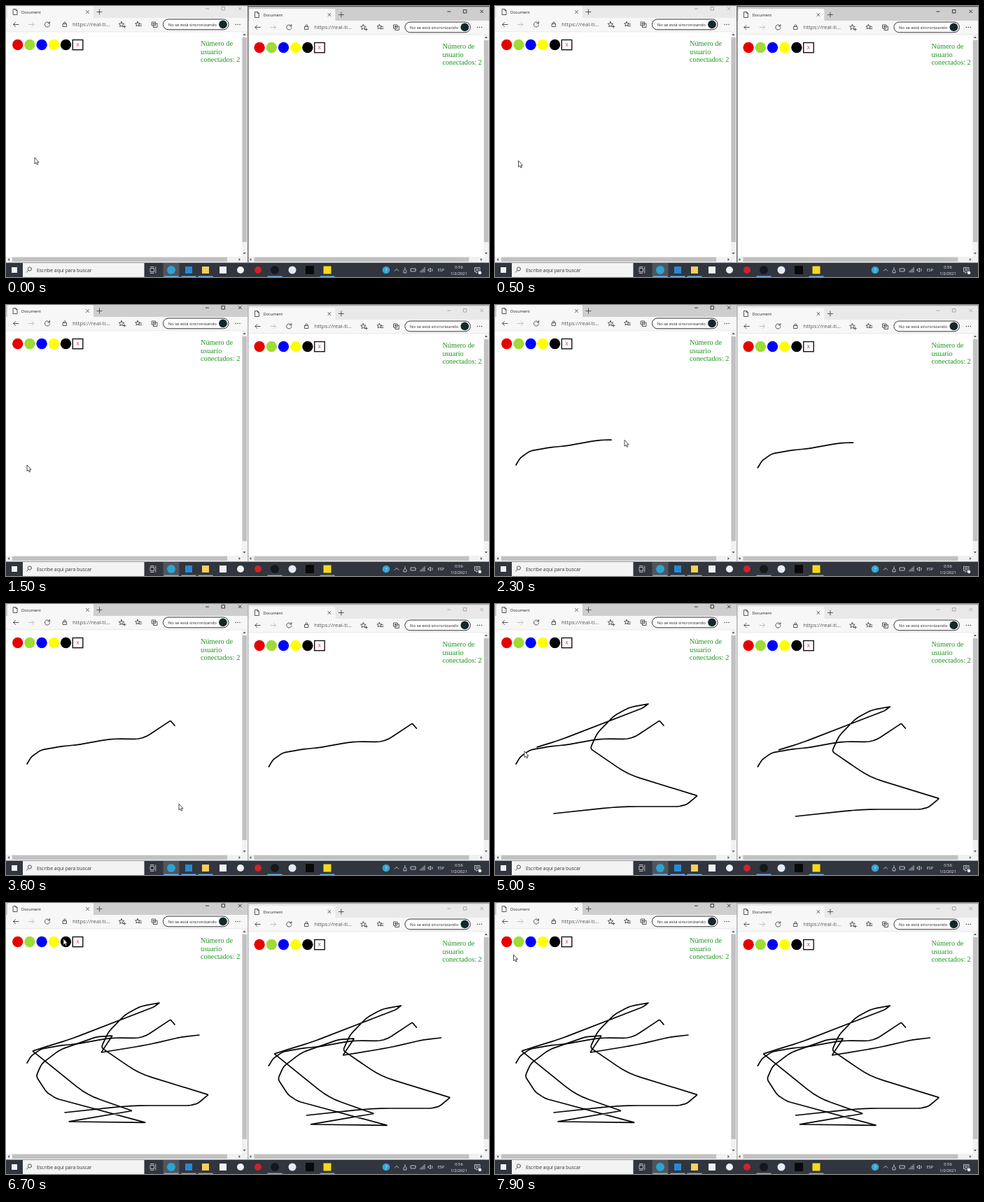
An HTML page that plays this animation: 690x388 px, repeating every 8000 ms.

```html
<!DOCTYPE html>
<html lang="es">
<head>
<meta charset="utf-8">
<title>Pizarra</title>
<style>
  html, body { margin: 0; width: 100%; height: 100%; overflow: hidden; background: #fff; }
  svg { display: block; width: 690px; height: 388px; }
  text { font-family: "Open Sans", "Noto Sans", sans-serif; fill: #222; }
  .count { font: 10.3px "Liberation Serif", "Times New Roman", serif; fill: #209420; }
  .icon { fill: none; stroke: #444; stroke-width: .9; stroke-linecap: round; stroke-linejoin: round; }
  .ink { fill: none; stroke: #000; stroke-width: 1.7; stroke-linecap: round; stroke-linejoin: round; }
  .strip { fill: #e9e9e9; }
  .ctl { fill: none; stroke: #999; stroke-width: .8; }
  .edge { stroke: #aaa; stroke-width: 1.3; }
  .on .strip { fill: #cecece; }
  .on .ctl { stroke: #111; }
  .on .edge { stroke: #555; }
  .tray { fill: none; stroke: #ddd; stroke-width: .8; }
  .light { fill: #f2f2f2; }
</style>
</head>
<body>
<svg id="stage" viewBox="0 0 690 388"></svg>
<script>
const LOOP = 8000, STEP = 100, FOCUS = 1500;
const LAG = 19;     // px of ink still missing behind the pointer
const BEND = .3;    // how far a corner is rounded into its sides

const START = [41, 217];
const moves = [
  { end: 1000, to: [[26, 226]] },
  { end: FOCUS, to: [[30, 229]] },
  { end: 2620, ink: true, to: [
    [36, 219], [50, 209], [78, 204], [103, 201.5], [150, 193], [195, 193.5], [235, 167], [241, 174]] },
  { end: 3600, to: [[247, 286]] },
  { end: 3900, to: [[84, 300]] },
  { end: 6370, ink: true, to: [
    [178, 290], [262, 290], [274, 287], [289, 274.5], [190, 244], [136, 207], [146, 185],
    [170, 160], [192, 148], [219, 143], [211, 149], [92, 195], [53, 207], [38, 212],
    [116, 275], [180, 297.5], [90, 313], [199, 314.3], [72, 280], [58, 271], [43, 248],
    [51, 230], [77, 210], [130, 191.5], [152, 190], [136, 214], [200, 203.5], [250, 192], [276, 189]] },
  { end: 6700, to: [[82, 51]] },
  { end: 7200, to: [[16, 52]] },
  { end: LOOP, to: [[28, 77]] }
];

const mix = (a, b, k) => a.map((v, i) => v + (b[i] - v) * k);
const gap = (a, b) => Math.hypot(b[0] - a[0], b[1] - a[1]);

// Rounds open corners and leaves sharp reversals pointed.
function smooth(pts) {
  return pts.flatMap((q, i) => {
    const p = pts[i - 1], n = pts[i + 1];
    if (!p || !n) return [q];
    const a = gap(p, q), b = gap(q, n);
    const dot = ((q[0] - p[0]) * (n[0] - q[0]) + (q[1] - p[1]) * (n[1] - q[1])) / (a * b);
    const r = BEND * Math.min(a, b) * (1 + dot) / 2;
    const from = mix(q, p, r / a), to = mix(q, n, r / b);
    return [0, .25, .5, .75, 1].map(k => mix(mix(from, q, k), mix(q, to, k), k));
  });
}

let time = 0, spot = START;
for (const move of moves) {
  move.start = time;
  move.pts = smooth([spot, ...move.to]);
  move.len = [0];
  move.pts.slice(1).forEach((p, i) => move.len.push(move.len[i] + gap(move.pts[i], p)));
  move.total = move.len.at(-1);
  time = move.end;
  spot = move.to.at(-1);
}

const distAt = (move, t) => move.total * (t - move.start) / (move.end - move.start);

// Points of a move up to distance d, with the last one interpolated.
function cut({ pts, len }, d) {
  const n = len.findIndex(l => l >= d);
  if (n < 1) return n ? pts : [pts[0]];
  return [...pts.slice(0, n), mix(pts[n - 1], pts[n], (d - len[n - 1]) / (len[n] - len[n - 1]))];
}

const rect = (x, y, w, h, fill, more = "") =>
  `<rect x="${x}" y="${y}" width="${w}" height="${h}" fill="${fill}" ${more}/>`;
const dot = (x, y, r, fill) => `<circle cx="${x}" cy="${y}" r="${r}" fill="${fill}"/>`;
const path = (cls, d) => `<path class="${cls}" d="${d}"/>`;
const text = (x, y, size, str, more = "") =>
  `<text x="${x}" y="${y}" font-size="${size}" ${more}>${str}</text>`;
const star = (x, y, r) => "M" + Array.from({ length: 10 }, (_, i) => {
  const a = i * Math.PI / 5 - Math.PI / 2, q = i % 2 ? r * .45 : r;
  return `${x + q * Math.cos(a)} ${y + q * Math.sin(a)}`;
}).join("L") + "Z";

function browser(id, dx, dy) {
  const swatches = ["#e60000", "#9fdc35", "#0000ff", "#ffff00", "#000"];
  const lines = ["Número de", "usuario", "conectados: 2"];
  const bottom = 367 - dy;
  return `<g id="${id}" transform="translate(${dx} ${dy})">
    ${rect(0, -4, 345, bottom + 4, "#fff")}
    <rect class="strip" x="0" y="-4" width="345" height="22"/>
    <path fill="#f7f7f7" d="M2 18V2Q2 0 4 0H123Q125 0 125 2V18Z"/>
    ${rect(0, 17, 345, 20, "#f7f7f7")}
    ${rect(0, 36.6, 345, .6, "#ddd")}
    ${path("icon", "M10.5 4.5h3.5l2 2v6h-5.5zM14 4.5v2h2")}
    ${text(22, 11, 5.7, "Document")}
    ${path("icon", "M114.5 6.5l4 4M118.5 6.5l-4 4M130 8.5h7M133.5 5v7")}
    ${path("ctl", "M285 4h5M308 1.5h4.5v4.5h-4.5zM332 1.5l4.5 4.5M336.5 1.5l-4.5 4.5")}
    ${path("icon", "M18 26.5h-7.5M13.5 23.5l-3 3 3 3")}
    <path class="icon" style="stroke:#bbb" d="M32.5 26.5h7.5M37 23.5l3 3-3 3"/>
    ${path("icon", "M62 24.5a3.6 3.6 0 1 0 .6 2.5M62.5 22.5v2.5h-2.5")}
    ${path("icon", "M81.5 25.5h5v4h-5zM82.7 25.5v-1.3a1.3 1.3 0 0 1 2.6 0v1.3")}
    ${text(95, 29.3, 7.8, "https://real-ti...", 'style="fill:#555"')}
    ${path("icon", star(165, 26.5, 4) + "M167.5 29.5h3.5M169.3 27.7v3.5")}
    ${path("icon", star(188, 26, 3.6) + "M190.5 26h3M190.5 28.5h3")}
    ${path("icon", "M208.5 23h5v5h-5zM210.5 28v2.5h5.5v-5.5h-2.5M211 24.3v2.5M209.8 25.5h2.5")}
    ${rect(224.5, 19, 93.5, 14.8, "#fff", 'rx="7.4" stroke="#333"')}
    ${text(231.7, 28.6, 5.95, "No se está sincronizando")}
    ${dot(310, 26.3, 5.9, "#14282c")}
    ${[328, 331, 334].map(x => dot(x, 26.5, .7, "#333")).join("")}
    ${swatches.map((c, i) => dot(16.7 + i * 17.2, 55.5, 7.7, c)).join("")}
    ${rect(95.3, 48.5, 14.5, 14.2, "#fff", 'stroke="#111" stroke-width="1.4"')}
    ${text(102.5, 58.2, 7, "X", 'text-anchor="middle" style="fill:#e0103a"')}
    ${lines.map((s, i) => `<text class="count" x="278" y="${57 + i * 11.7}">${s}</text>`).join("")}
    ${rect(337, 37.2, 8, bottom - 37.2, "#f1f1f1")}
    ${rect(0, bottom - 8, 345, 8, "#f1f1f1")}
    ${rect(337.5, 45, 6.5, 293 - dy, "#c1c1c1")}
    ${rect(9, bottom - 7.3, 307, 6.3, "#c1c1c1")}
    <path fill="#555" d="M338.5 42l2-2.5 2 2.5zM338.5 ${bottom - 14}l2 2.5 2-2.5z
      M5 ${bottom - 6}l-2.5 2 2.5 2zM332.5 ${bottom - 6}l2.5 2-2.5 2z"/>
    <polyline class="ink"/><polyline class="ink"/>
    ${dx ? path("edge", `M.4 -4V${bottom}M0 -3.5H345`) : ""}
  </g>`;
}

function taskbar() {
  const square = (x, fill, r = 5) => rect(x - r, 378 - r, 2 * r, 2 * r, fill);
  const light = (x, y, size, str) => text(x, y, size, str, 'text-anchor="middle" class="light"');
  const bars = [0, 1, 2, 3].map(i => `M${592 + i * 2} 381.5v${-2 - i * 1.8}`).join("");
  return rect(0, 367.5, 690, 20.5, "#31353e") +
    square(12, "#f2f2f2", 4) +
    rect(24, 368, 173.5, 20, "#f3f3f3") +
    path("icon", "M36.5 376.5a2.6 2.6 0 1 0-5.2 0a2.6 2.6 0 1 0 5.2 0M32 378.5l-2.5 2.8") +
    text(44, 380.8, 6.9, "Escribe aquí para buscar", 'style="fill:#333"') +
    path("tray", "M206 375.5h5.5v5h-5.5zM206 373.5h5.5M206 382.5h5.5M213.8 373.5v9") +
    rect(224.5, 368, 23, 20, "#50555d") +
    dot(236, 378, 6, "#2da4d0") + square(261, "#2789d2") + square(285, "#f6cf5c") +
    square(310, "#f2f2f2") + dot(335, 378, 5, "#f2f2f2") + dot(360, 378, 5, "#d3222a") +
    dot(384, 378, 6, "#15181a") + dot(409, 378, 5.5, "#e6eaf2") +
    square(434, "#090909", 6) + square(459, "#f7d91c", 5.5) +
    [236, 261, 285, 384, 459].map(x => rect(x - 10.5, 386.7, 21, 1.3, "#76b9ed")).join("") +
    dot(543, 378, 5.3, "#35a4d4") + light(543, 380.7, 7.5, "?") +
    path("tray", "M555 379.5l3-3 3 3M570 374v3l-2 2v3h4v-3l-2-2M578 376h7v4h-7zM585 377.5h1" + bars +
      "M603 377h1.5l2-2v6l-2-2h-1.5zM608.5 376q1.5 2 0 4" +
      "M669.5 374.5h7.5v6h-3l-2 2v-2h-2.5zM671 376.5h4.5M671 378.5h4.5") +
    light(621.5, 380.3, 5.5, "ESP") + light(647, 375.8, 5.7, "0:56") + light(647, 385, 5.7, "1/2/2021") +
    dot(677, 382, 2.3, "#eee");
}

const stage = document.getElementById("stage");
stage.innerHTML = browser("left", 0, 0) + browser("right", 345.4, 4) + taskbar() +
  `<path id="pointer" fill="#fff" stroke="#222" stroke-width=".8" stroke-linejoin="round"
    d="M0 0V9L2 7.2L3.4 10.2L4.8 9.5L3.5 6.7H6Z"/>`;
const [left, right, pointer] = ["left", "right", "pointer"].map(id => document.getElementById(id));
const strokes = moves.filter(m => m.ink);

function draw(t) {
  left.classList.toggle("on", t >= FOCUS);
  right.classList.toggle("on", t < FOCUS);
  strokes.forEach((move, i) => {
    const d = t >= move.end ? move.total : distAt(move, t) - LAG;
    const points = d > 0 ? cut(move, d).join(" ") : "";
    for (const pane of [left, right])
      pane.querySelectorAll(".ink")[i].setAttribute("points", points);
  });
  const move = moves.find(m => t < m.end);
  const [x, y] = cut(move, distAt(move, t)).at(-1);
  pointer.setAttribute("transform", `translate(${x} ${y})`);
}

const begin = performance.now();
function tick() {
  const t = (performance.now() - begin) % LOOP;
  draw(Math.floor(t / STEP) * STEP);
  requestAnimationFrame(tick);
}
tick();
</script>
</body>
</html>
```
